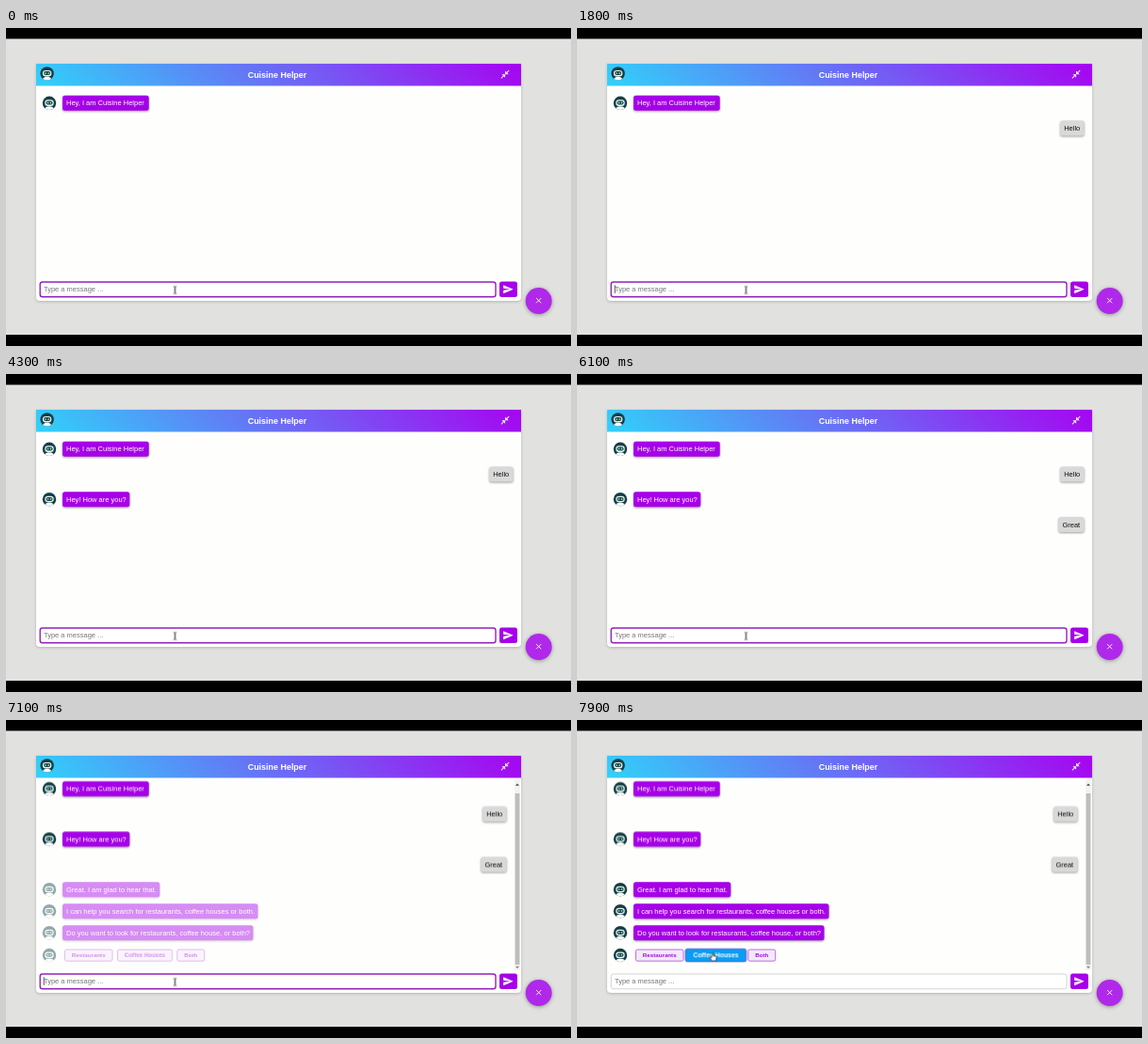
An HTML page for the animation above (8 s loop, 600 by 338 pixels).

```html
<!DOCTYPE html>
<html lang="en">
<head>
<meta charset="utf-8">
<title>Chat demo</title>
<style>
  html, body { margin: 0; width: 100%; height: 100%; overflow: hidden; background: #000; }
  svg { display: block; width: 600px; height: 338px; font: 7.5px "Liberation Sans", Arial, sans-serif; }
  .window { filter: drop-shadow(0 1px 1.5px rgba(0, 0, 0, .2)); }
  .bubble { filter: drop-shadow(0 1px 1px rgba(0, 0, 0, .38)); }
  .fab { filter: drop-shadow(0 1.5px 2px rgba(0, 0, 0, .35)); }
  .title { font-size: 8.95px; font-weight: bold; }
  .choice { font-size: 6.2px; font-weight: bold; transform-box: fill-box; transform-origin: center; }
</style>
</head>
<body>
<svg id="stage" viewBox="0 0 600 338">
  <defs>
    <linearGradient id="head" gradientUnits="userSpaceOnUse" x1="155" y1="184" x2="424" y2="-85">
      <stop offset="0" stop-color="#30d2f9"/>
      <stop offset="1" stop-color="#a604f0"/>
    </linearGradient>
    <clipPath id="round"><circle r="7.2"/></clipPath>
    <clipPath id="view"><rect x="32" y="61.5" width="515" height="205"/></clipPath>
    <g id="bot">
      <circle r="7.2" fill="#153f48"/>
      <g clip-path="url(#round)">
        <ellipse cy="7.4" rx="5.2" ry="4" fill="#fbfdfc"/>
        <rect x="-4.7" y="-3.5" width="9.4" height="6.6" rx="3.2" fill="#e9f5ef"/>
        <rect x="-3.5" y="-2.3" width="7" height="4" rx="2" fill="#153f48"/>
        <circle cx="-1.5" cy="-.3" r=".9" fill="#8fe0b4"/>
        <circle cx="1.5" cy="-.3" r=".9" fill="#8fe0b4"/>
      </g>
    </g>
  </defs>

  <rect y="11.5" width="600" height="314.5" fill="#e1e1df"/>
  <path class="window" d="M32 38H547V286q0 4-4 4H36q-4 0-4-4z" fill="#fefefd"/>

  <g clip-path="url(#view)">
    <g id="bar">
      <rect x="540" y="63" width="6" height="203" fill="#f3f3f2"/>
      <rect x="540.6" y="78" width="4.8" height="182" fill="#bdbdbd"/>
      <path d="M541 69.8h4l-2-2.4z" fill="#444"/>
      <path d="M541 261.8h4l-2 2.4z" fill="#888"/>
    </g>
    <g id="log"><g id="mine"></g></g>
    <g id="replies"></g>
  </g>

  <rect x="32" y="38" width="515" height="23.5" fill="url(#head)"/>
  <use href="#bot" x="43.6" y="48.4"/>
  <text class="title" x="288" y="52.6" text-anchor="middle" fill="#fff">Cuisine Helper</text>
  <path transform="translate(524.7 43.8) scale(.45)" fill="#fff"
    d="M22 3.4 16.7 8.7 20 12h-8V4l3.3 3.3L20.6 2zM3.4 22l5.3-5.3L12 20v-8H4l3.3 3.3L2 20.6z"/>

  <rect id="field" x="36.2" y="270" width="483.8" height="15.8" rx="2.5" fill="#fff"/>
  <g id="entry"></g>
  <rect id="caret" x="39.8" y="273.3" width=".8" height="8.6" fill="#222"/>

  <rect x="524" y="269.6" width="19" height="16.4" rx="2.5" fill="#a600e8"/>
  <path transform="translate(527.2 271.8) scale(.5)" fill="#fff" d="M2 21 23 12 2 3v7l15 2-15 2z"/>

  <circle class="fab" cx="565.7" cy="290.1" r="14" fill="#b028ea"/>
  <path d="M563.1 287.1l5.2 5.2m0-5.2l-5.2 5.2" stroke="#fff" stroke-width=".9"/>

  <g id="pointer">
    <path id="beam" d="M-1.7-4q1.7 0 1.7 1v6q0 1-1.7 1M1.7-4Q0-4 0-3v6q0 1 1.7 1" fill="none" stroke="#444" stroke-width=".8"/>
    <path id="arrow" d="M0-4v8l2-1.8 1.3 2.8 1.2-.6-1.3-2.7h2.6z" fill="#222" stroke="#fff" stroke-width=".5"/>
    <path id="hand" d="M-.9-3.6q.8-1 1.5 0v2.7l2.7.6q.9.3.8 1.3l-.5 3.4H-.6L-3 1.2q.1-1.2 1.1-.7l1 .8z" fill="#fff" stroke="#222" stroke-width=".7"/>
  </g>
</svg>
<script>
const LOOP = 8000;
const PURPLE = '#a600e8';
const $ = id => document.getElementById(id);

function add(parent, tag, attrs, text) {
  const el = document.createElementNS('http://www.w3.org/2000/svg', tag);
  for (const k in attrs) el.setAttribute(k, attrs[k]);
  if (text) el.textContent = text;
  return parent.appendChild(el);
}

// Stops are [ms, value, easing]; a value holds until the next stop unless eased.
function track(el, prop, ...stops) {
  const frames = stops.map(([t, v, easing = 'steps(1)']) => ({ offset: t / LOOP, [prop]: v, easing }));
  frames.push({ offset: 1, [prop]: stops[stops.length - 1][1] });
  el.animate(frames, { duration: LOOP, iterations: Infinity });
}

function show(el, ...spans) {
  const stops = spans[0][0] > 0 ? [[0, 0]] : [];
  for (const [from, to] of spans) {
    stops.push([from, 1]);
    if (to < LOOP) stops.push([to, 0]);
  }
  track(el, 'opacity', ...stops);
}

const fadeIn = (el, t) => track(el, 'opacity', [0, 0], [t, 0, 'ease'], [t + 750, 1]);

function bubble(parent, x, right, y, text, fill, ink) {
  const g = add(parent, 'g', {});
  add(g, 'rect', { class: 'bubble', x, y: y - 8, width: right - x, height: 16, rx: 2.5, fill });
  add(g, 'text', { x: x + 4, y: y + 2.5, fill: ink }, text);
  return g;
}

function botSays(parent, y, right, text) {
  const g = add(parent, 'g', {});
  add(g, 'use', { href: '#bot', x: 46, y });
  bubble(g, 60, right, y, text, PURPLE, '#fff');
  return g;
}

// Conversation
const log = $('log'), mine = $('mine'), replies = $('replies');
const REPLY = 6900;
botSays(log, 79.8, 151.7, 'Hey, I am Cuisine Helper');
fadeIn(botSays(log, 133.2, 131.3, 'Hey! How are you?'), 3000);
show(bubble(mine, 513.2, 538.6, 106.6, 'Hello', '#d9d9d9', '#111'), [1700, LOOP]);
show(bubble(mine, 511.4, 538.6, 160, 'Great', '#d9d9d9', '#111'), [6100, LOOP]);

botSays(replies, 180.2, 163.3, 'Great. I am glad to hear that.');
botSays(replies, 203.2, 267.5, 'I can help you search for restaurants, coffee houses or both.');
botSays(replies, 226.2, 262.5, 'Do you want to look for restaurants, coffee house, or both?');
add(replies, 'use', { href: '#bot', x: 46, y: 250 });

function choice(x, right, text) {
  const g = add(replies, 'g', { class: 'choice' });
  const box = add(g, 'rect', { x, y: 244, width: right - x, height: 12.2, rx: 1.8, fill: '#f3e9f8', stroke: '#b048dc', 'stroke-width': .8 });
  const label = add(g, 'text', { x: (x + right) / 2, y: 252.2, 'text-anchor': 'middle', fill: '#a010dc' }, text);
  return { g, box, label };
}
choice(62.5, 113, 'Restaurants');
choice(181.8, 210.7, 'Both');
const picked = choice(118.3, 176.5, 'Coffee Houses');
const hover = (el, prop, a, b) => track(el, prop, [0, a], [7700, a, 'ease'], [7880, b]);
hover(picked.g, 'transform', 'scale(1)', 'scale(1.11)');
hover(picked.box, 'fill', '#f3e9f8', '#0b9cf4');
hover(picked.box, 'stroke', '#b048dc', '#5a50e4');
hover(picked.label, 'fill', '#a010dc', '#fff');

fadeIn(replies, REPLY);
show($('bar'), [REPLY, LOOP]);
track(log, 'transform', [0, 'translate(0px, 0px)'], [REPLY, 'translate(0px, -6.6px)']);
track(mine, 'transform', [0, 'translate(0px, 0px)'], [REPLY, 'translate(-7px, 0px)']);

// Message field: when each letter lands, then when the text is sent
const entry = $('entry');
const line = (text, fill) => add(entry, 'text', { x: 40, y: 280.1, fill }, text);
const typing = [
  ['Hello', [800, 1000, 1100, 1200, 1300], 1700],
  ['Great', [4700, 5100, 5200, 5400, 5600], 6100]
];
const caretStops = [[0, 'translateX(0px)']];
for (const [word, keys, sent] of typing) {
  keys.forEach((t, i) => {
    const el = line(word.slice(0, i + 1), '#222');
    caretStops.push([t, `translateX(${el.getComputedTextLength()}px)`]);
    show(el, [t, keys[i + 1] || sent]);
  });
  caretStops.push([sent, 'translateX(0px)']);
}
show(line('Type a message ...', '#777'), [0, 800], [1700, 4700], [6100, LOOP]);
track($('caret'), 'transform', ...caretStops);
show($('caret'), [200, 1900], [2500, 3100], [3700, 4300], [4700, 6100], [6700, 7300]);
track($('field'), 'stroke', [0, '#9222b8'], [7900, '#cfcfcf']);
track($('field'), 'strokeWidth', [0, '1.4px'], [7900, '0.9px']);

// Pointer
track($('pointer'), 'transform', [0, 'translate(179.5px, 278.5px)'],
  [7500, 'translate(179.5px, 278.5px)', 'ease-in-out'], [7750, 'translate(144px, 251.5px)']);
show($('beam'), [0, 7600]);
show($('arrow'), [7600, 7700]);
show($('hand'), [7700, LOOP]);
</script>
</body>
</html>
```
